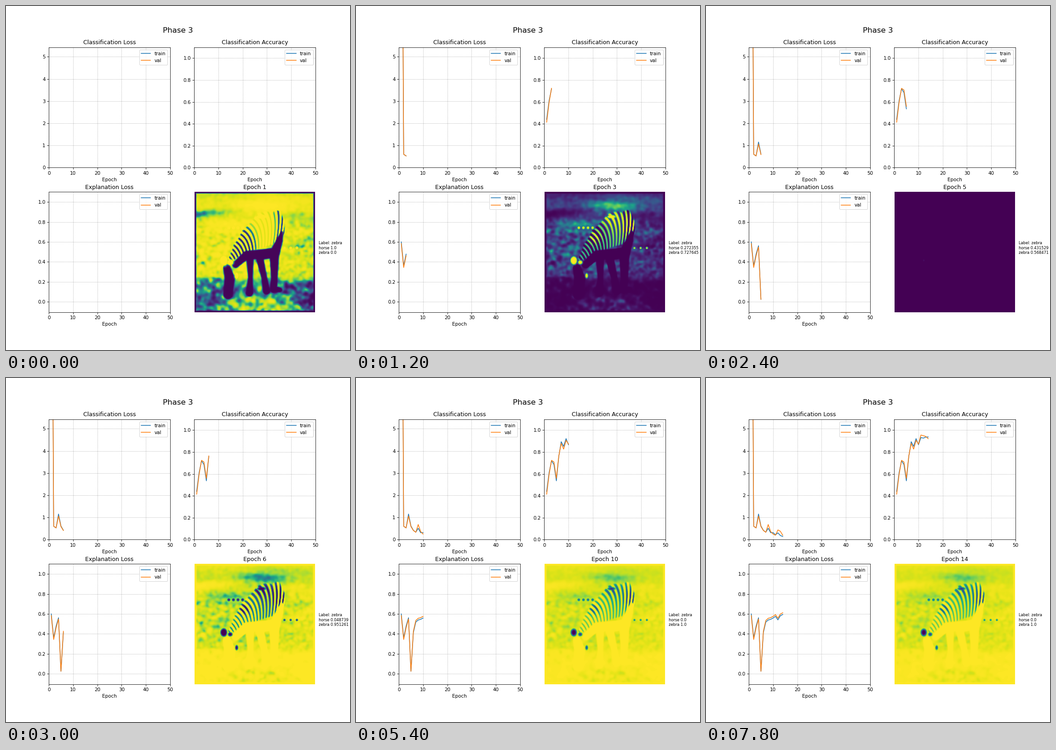
A matplotlib script for the animation above (8 s loop, 748 by 748 pixels).

```python
import numpy as np
import matplotlib.pyplot as plt
from matplotlib.animation import FuncAnimation

SIZE = 748
EPOCHS = 14
HOLD = 3          # ticks per epoch
TICKS = 40
TICK_MS = 200
N = 224           # mask resolution

plt.rcParams["font.family"] = "DejaVu Sans"

# Probability of the wrong class; zero where absent.
HORSE = {1: 1.0, 2: .462442, 3: .272355, 5: .431529, 6: .048739, 7: .004316, 12: 2.4e-5}

rng = np.random.default_rng(5)
x, y = np.meshgrid(np.linspace(411, 672, N), np.linspace(404.5, 665, N))
epochs = np.arange(1, EPOCHS + 1)


def sigmoid(a):
    return 1 / (1 + np.exp(-a))


def mix(a, b, t):
    return a + (b - a) * t


def bell(a, centre, width):
    return np.exp(-.5 * ((a - centre) / width) ** 2)


def glow(cx, cy, sx, sy):
    return bell(x, cx, sx) * bell(y, cy, sy)


def noise(sx, sy):
    fx, fy = np.fft.fftfreq(N)[None, :], np.fft.fftfreq(N)[:, None]
    kernel = np.exp(-2 * np.pi ** 2 * ((sx * fx) ** 2 + (sy * fy) ** 2))
    a = np.fft.ifft2(np.fft.fft2(rng.standard_normal((N, N))) * kernel).real
    return (a - a.mean()) / a.std()


def stroke(*joints):
    """Soft tapered limb through (x, y, radius) joints."""
    gap = np.full((N, N), np.inf)
    for (x0, y0, r0), (x1, y1, r1) in zip(joints, joints[1:]):
        dx, dy = x1 - x0, y1 - y0
        t = np.clip(((x - x0) * dx + (y - y0) * dy) / (dx * dx + dy * dy), 0, 1)
        away = np.hypot(x - x0 - t * dx, y - y0 - t * dy)
        gap = np.minimum(gap, away - mix(r0, r1, t))
    return sigmoid(-1.4 * gap)


def field():
    blotch, streak = noise(2.6, 2.4), noise(26, 4)
    sky = .46 + .02 * streak + .04 * blotch * mix(.35, 1, sigmoid((y - 470) / 12))
    sky += .18 * glow(555, 433, 50, 7) - .18 * glow(425, 451, 55, 6)
    sky += .06 * glow(480, 487, 35, 16) - .05 * glow(645, 520, 25, 50)
    sky -= .07 * sigmoid((413 - y) / 2)
    ground = .24 + .06 * noise(3, 3)
    ground += .1 * glow(540, 642, 60, 13) + .12 * glow(540, 657, 120, 6)
    ground -= .13 * glow(667, 648, 18, 25)
    return mix(sky, ground, sigmoid((y - 594 + 4 * streak) / 5))


def stripes():
    """Arched bands that follow one another up the neck and over the rump."""
    along = .6 * (x - 490) + .8 * (550 - y)
    across = .8 * (x - 490) - .6 * (550 - y)
    s = np.maximum(along + .015 * (across + 12) ** 2, -50)
    wave = sigmoid(3 * np.sin(2 * np.pi * 30 * np.log(1 + s / 240)))
    white = .66 + .32 * glow(598, 478, 9, 20) + .26 * glow(519, 502, 9, 9)
    white += .16 * glow(556, 462, 14, 9) + .09 * glow(575, 475, 20, 22)
    dark = .08 + .34 * np.exp(-((s - 114) / 38) ** 4)
    return mix(white, dark, wave)


def brightness():
    level = field()
    neck = stroke((487, 553, 4), (510, 525, 15), (535, 505, 26), (568, 484, 37))
    tail = stroke((589, 453, 9), (598, 470, 8), (600, 492, 6))
    level = mix(level, stripes(), np.maximum(neck, tail))

    dark_parts = (
        stroke((481, 570, 8), (487, 592, 11), (483, 627, 10)),
        stroke((500, 562, 7), (524, 541, 9), (558, 540, 11),
               (585, 536, 11), (595, 510, 7), (600, 492, 3)),
        stroke((531, 550, 8), (532, 590, 5), (530, 623, 8)),
        stroke((553, 552, 8), (562, 590, 6), (567, 619, 8)),
        stroke((584, 545, 10), (584, 590, 7), (582, 615, 8), (596, 617, 5)),
    )
    for part in dark_parts:
        level = mix(level, .03, part)

    spots = [1.2 * glow(474, 553, 6, 7.5), .92 * glow(488, 557, 5, 4.5),
             .86 * glow(502, 586, 3.5, 6), .92 * glow(556, 458, 10, 4)]
    spots += [.82 * glow(cx, 482, 4, 4) for cx in range(485, 520, 10)]
    spots += [.8 * glow(606 + 13.5 * i, 526, 2.8, 2.8) for i in range(3)]
    level = np.maximum.reduce([level] + spots)

    rim = np.minimum.reduce([x - 411, 672 - x, y - 404.5, 665 - y])
    return level * sigmoid((rim - 2.6) * 2)


def response(epoch):
    """Centre and gain: bright parts first, later the inverse."""
    early = {1: (.272, 18), 2: (.80, 20), 3: (.56, 15), 4: (.394, 22), 5: (1.3, 30)}
    settle = np.exp((6 - epoch) / 1.5)
    return early.get(epoch, (.74 - .12 * settle, -10 - 6 * settle))


def jumps(heights):
    """Sudden jumps at given epochs that die away again."""
    return sum(h * np.where(epochs >= at, np.exp(1.2 * (at - epochs)), 0)
               for at, h in heights.items())


def loss(heights):
    curve = .6 * np.exp(.13 * (2 - epochs)) + jumps(heights)
    curve[0] = 20
    return curve


loss_curves = loss({4: .69, 8: .23, 10: .08, 12: .13}), loss({4: .6, 8: .4, 12: .27, 13: .15})

accuracy = .44 + .5 * (1 - np.exp(.42 * (1 - epochs))) - .31 * bell(epochs, 5, .7)
accuracy -= .08 * (epochs % 2 == 0) * bell(epochs, 9, 1.4)
accuracy_curves = accuracy, accuracy + .025 * np.cos(2 * np.pi * (epochs - 4.5) / 7)

explanation = .6 - jumps({2: .24, 3: .05, 5: .56, 12: .05}) - .05 * bell(epochs, 8.8, 1.8)
explanation_curves = explanation, explanation + .017 * np.tanh(epochs - 5)

level = brightness()
masks = [sigmoid(gain * (level - centre)) for centre, gain in map(response, epochs)]

fig, axes = plt.subplots(2, 2, figsize=(10, 10), dpi=SIZE / 10)
fig.subplots_adjust(left=.1245, right=.8995, bottom=.11024, top=.88024)
fig.text(.5, 1 - 58 / SIZE, "Phase 3", size=16, ha="center", va="baseline")


def chart(ax, title, ylim, data):
    ax.set(title=title, xlabel="Epoch", xlim=(0, 50), ylim=ylim)
    ax.grid(color="gray", ls=":", lw=.7)
    lines = [ax.plot([], [], label=name)[0] for name in ("train", "val")]
    ax.legend(loc="upper right")
    return list(zip(lines, data))


curves = (
    chart(axes[0, 0], "Classification Loss", (0, 5.43), loss_curves)
    + chart(axes[0, 1], "Classification Accuracy", (0, 1.1), accuracy_curves)
    + chart(axes[1, 0], "Explanation Loss", (-.105, 1.105), explanation_curves)
)

view = axes[1, 1]
view.axis("off")
image = view.imshow(masks[0], cmap="viridis", vmin=0, vmax=1)
caption = fig.text(679.5 / SIZE, 1 - 539 / SIZE, "", size=8, va="baseline")


def update(tick):
    epoch = tick // HOLD + 1
    for line, values in curves:
        line.set_data(epochs[:epoch], values[:epoch])
    image.set_data(masks[epoch - 1])
    view.set_title(f"Epoch {epoch}")
    horse = HORSE.get(epoch, 0.0)
    caption.set_text(f"Label: zebra\nhorse {horse}\nzebra {round(1 - horse, 6)}")
    return []


anim = FuncAnimation(fig, update, frames=TICKS, interval=TICK_MS, repeat=True,
                     repeat_delay=0, init_func=lambda: update(0))
plt.show()
```
